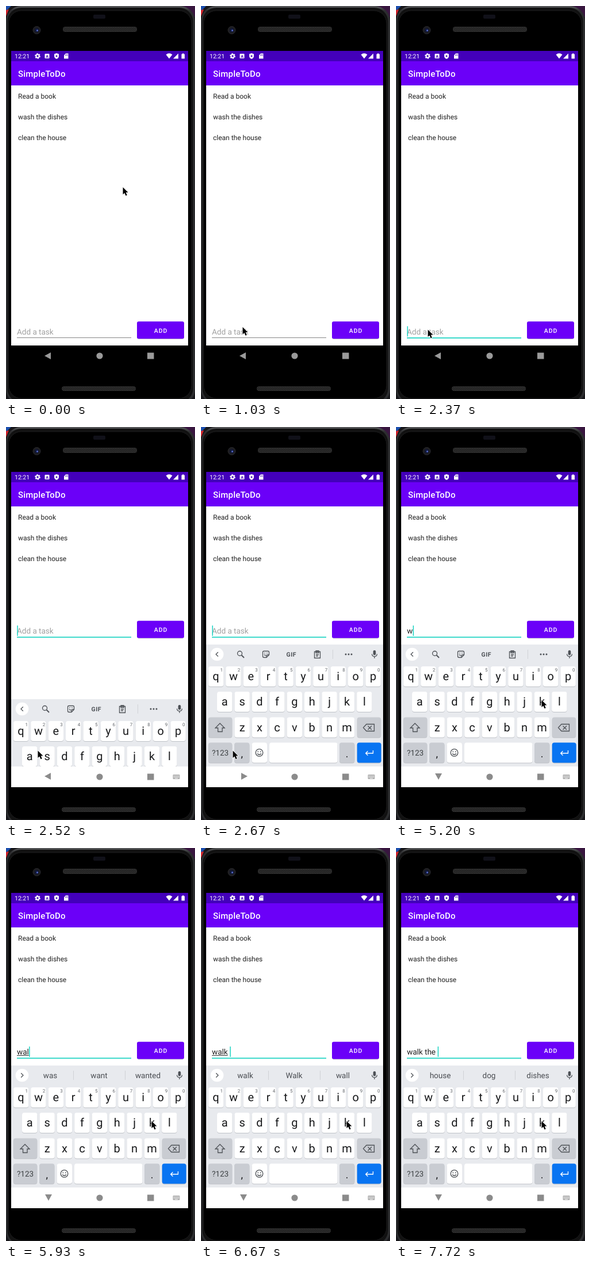
Write an HTML page that moves like this. It is 329 by 683 pixels and loops after 8000 ms.

```html
<!DOCTYPE html>
<html lang="en">
<head>
<meta charset="utf-8">
<title>To-do app</title>
<style>
  html, body { margin: 0; width: 100%; height: 100%; overflow: hidden; background: #000; }
  svg { display: block; width: 329px; height: 683px; }
  text { font-family: Roboto, sans-serif; white-space: pre; text-rendering: geometricPrecision; }
  .mid { text-anchor: middle; }
  .medium { font-weight: 500; }
  .item { font-size: 12px; fill: #212121; }
  .field { font-size: 13.5px; }
  .line { fill: none; stroke: #4d5156; stroke-width: 1.3; }
  .letter { font-size: 20px; fill: #17181a; }
</style>
</head>
<body>
<svg viewBox="0 0 329 683">
  <defs>
    <pattern id="mesh" width="3" height="3" patternUnits="userSpaceOnUse">
      <rect width="3" height="3" fill="#1d1d1d"/>
      <path d="M0 3L3 0" stroke="#3b3b3b"/>
    </pattern>
    <linearGradient id="rim" x2="0" y2="1">
      <stop offset="0" stop-color="#5a5b5d"/>
      <stop offset=".012" stop-color="#2c2d2f"/>
      <stop offset="1" stop-color="#2c2d2f"/>
    </linearGradient>
    <clipPath id="keyboardArea"><rect x="9" y="378" width="308" height="212"/></clipPath>
  </defs>

  <!-- phone -->
  <rect width="329" height="683" fill="#17171a"/>
  <path d="M0 0H9L0 9Z" fill="#1c4fae"/>
  <path d="M0 7L5 6L0 18Z" fill="#d0242c"/>
  <path d="M308 0H329V20Z" fill="#38163f"/>
  <rect x="0" y="0" width="329" height="692" rx="26" fill="url(#rim)"/>
  <rect x="2.5" y="3" width="323" height="686" rx="24" fill="#111"/>
  <rect x="4.500" y="8" width="318.500" height="674" rx="22" fill="#000" stroke="#1d1d1e"/>
  <rect x="152" y="15" width="21" height="7" rx="2" fill="#111119"/>
  <circle cx="53.500" cy="42" r="6.500" fill="#1c1c20" stroke="#2b2b2e"/>
  <circle cx="53.500" cy="42" r="3.500" fill="#10183a"/>
  <circle cx="54.500" cy="42.500" r="1.500" fill="#5a6cc8"/>
  <rect x="99.500" y="36.500" width="128" height="8" rx="3" fill="url(#mesh)" stroke="#303030"/>
  <rect x="97.500" y="661.500" width="128" height="7" rx="3" fill="url(#mesh)" stroke="#303030"/>

  <!-- app -->
  <rect x="9" y="78" width="308" height="512" fill="#fff"/>
  <rect x="9" y="78" width="308" height="18" fill="#4300ba"/>
  <rect x="9" y="96" width="308" height="42" fill="#6b00f8"/>
  <g fill="#fff">
    <text x="15" y="91" font-size="10.500">12:21</text>
    <circle cx="55" cy="87" r="2.700" fill="none" stroke="#fff" stroke-width="2"/>
    <circle cx="55" cy="87" r="4.100" fill="none" stroke="#fff" stroke-width="1.600" stroke-dasharray="2.1 2.193"/>
    <rect x="67.500" y="83" width="8" height="8" rx="1"/>
    <text class="mid" x="71.500" y="89.600" font-size="7" font-weight="700" fill="#4300ba">A</text>
    <path d="M88 82L92 83.500V87Q92 90.500 88 92Q84 90.500 84 87V83.500Z"/>
    <circle cx="88" cy="87" r="1.500" fill="#4300ba"/>
    <path d="M104 82.500H108.500V91.500H101V85.500Z"/>
    <path d="M103.500 84.500V86.500M105.200 84V86.500M107 84V86.500" stroke="#4300ba" stroke-width=".8"/>
    <path d="M278.500 84.500Q284 80 289.500 84.500L284 91.500Z"/>
    <path d="M291 91.500H300V82.500Z"/>
    <path d="M305.500 83.500H307V82.500H309.500V83.500H311V91.500H305.500Z"/>
    <text class="medium" x="21" y="123" font-size="15" letter-spacing=".19">SimpleToDo</text>
  </g>
  <text class="item" x="21" y="160.500">Read a book</text>
  <text class="item" x="21" y="196.500">wash the dishes</text>
  <text class="item" x="21" y="232.500">clean the house</text>

  <g id="entry">
    <text id="hint" class="field" x="19" y="570.500" fill="#a0a0a0">Add a task</text>
    <text id="typed" class="field" x="19" y="570.500" fill="#212121"></text>
    <rect id="composing" y="571.500" height="1" fill="#333"/>
    <rect id="baseline" x="19" y="576" width="199"/>
    <rect id="caret" y="556.500" width="1.500" height="18" fill="#1ad3c2"/>
    <rect x="228" y="549" width="82" height="30" rx="3.500" fill="#bdbdc4"/>
    <rect x="228" y="548.300" width="82" height="30" rx="3" fill="#6b00f8"/>
    <text class="mid medium" x="269.500" y="567.500" font-size="10.500" letter-spacing=".94" fill="#fff">ADD</text>
  </g>

  <!-- keyboard -->
  <g clip-path="url(#keyboardArea)">
    <g id="keyboard">
      <rect x="9" y="378" width="308" height="212" fill="#e8eaee"/>
      <circle cx="28" cy="395" r="11.300" fill="#fff"/>
      <path id="chevron" class="line" d="M29.800 391.200L26 395L29.800 398.800"/>
      <g id="tools" class="line">
        <circle cx="67.500" cy="393.500" r="4"/>
        <path d="M70.500 396.500L75 401" stroke-width="1.800"/>
        <path d="M109.500 389.500H116.500Q118.500 389.500 118.500 391.500V396L114 400.500H109.500Q107.500 400.500 107.500 398.500V391.500Q107.500 389.500 109.500 389.500ZM118.500 396H116Q114 396 114 398V400.500"/>
        <path d="M110.200 392.800H111.700M114.300 392.800H115.800M110.200 395.300Q111.500 397.500 113.500 396.500"/>
        <path d="M197.500 390.500H207.500V401.500H197.500ZM200 392.500H205V389H200ZM200 395.500H205M200 398H204"/>
        <path d="M229.500 387V403" stroke="#d0d2d6" stroke-width="1"/>
        <g fill="#4d5156" stroke="none">
          <text class="mid" x="157.300" y="398.600" font-size="10.500" font-weight="700" letter-spacing=".5">GIF</text>
          <circle cx="252" cy="395" r="1.500"/><circle cx="257" cy="395" r="1.500"/><circle cx="262" cy="395" r="1.500"/>
        </g>
      </g>
      <g id="suggestions" class="field mid" fill="#4a4d52">
        <path d="M117.500 387V403M207.500 387V403" stroke="#d0d2d6"/>
        <text x="77" y="400"></text><text x="162" y="400"></text><text x="247" y="400"></text>
      </g>
      <rect x="299.700" y="388" width="4.600" height="8.500" rx="2.300" fill="#4d5156"/>
      <path class="line" d="M297.500 394.500Q298 398.800 302 398.800T306.500 394.500M302 399V402"/>
      <g id="keys"></g>
      <g class="line">
        <path d="M33 515L41 523H37V529.500H29.500V523H25Z"/>
        <path d="M288 516.500H301.500V528.500H288L282.500 522.500ZM290.500 519.500L297 526M297 519.500L290.500 526"/>
        <circle cx="101.500" cy="566" r="6.300"/>
        <path d="M98.200 567.500Q101.500 571.500 104.800 567.500"/>
        <path d="M98.500 564.300H100M103 564.300H104.500" stroke-width="1.800"/>
        <path d="M299.500 562V567H287M290.500 563.200L286.700 567L290.500 570.800" style="stroke:#fff"/>
      </g>
    </g>
  </g>

  <!-- navigation bar -->
  <rect id="navBar" x="9" y="590" width="308" height="36"/>
  <g id="navIcons">
    <path id="back" d="M-6 0L5 -6V6Z"/>
    <circle cx="163" cy="608" r="5.600"/>
    <rect x="246" y="602.500" width="11.500" height="11"/>
    <g id="switcher" fill="#b4b4b4">
      <rect x="290.500" y="604" width="12" height="8" rx="1"/>
      <path d="M292 606.500H301M292 608.500H301" stroke="#fff" stroke-dasharray="1 1"/>
      <path d="M294 610.500H299" stroke="#fff" stroke-width=".8"/>
    </g>
  </g>
  <path id="pointer" d="M0 0V12.500L2.900 9.900L5 14.800L7.200 13.800L5.200 9.100H9Z" fill="#000" stroke="#fff" stroke-width="1.400" paint-order="stroke"/>
</svg>
<script>
const LOOP = 8000;
const $ = id => document.getElementById(id);
const show = (id, on) => $(id).setAttribute('visibility', on ? 'inherit' : 'hidden');
const set = (id, attrs) => Object.entries(attrs).forEach(([k, v]) => $(id).setAttribute(k, v));

// Last row whose start time has passed.
const at = (rows, t) => rows.reduce((found, row) => row[0] <= t ? row : found);

function key(x, y, w, fill = '#fff', label = '', size = 20, dy = 24) {
  return `<rect x="${x}" y="${y + 1}" width="${w}" height="35" rx="4" fill="#bfc2c7"/>
    <rect x="${x}" y="${y}" width="${w}" height="35" rx="4" fill="${fill}"/>
    <text class="letter mid" x="${x + w / 2}" y="${y + dy}" style="font-size:${size}px">${label}</text>`;
}

function buildKeys() {
  const pitch = 30.4, gray = '#c9ccd2';
  let out = '';
  [['qwertyuiop', 26, 416], ['asdfghjkl', 41.2, 460], ['zxcvbnm', 71.6, 504.5]].forEach(([letters, start, y], row) => {
    [...letters].forEach((c, i) => {
      const x = start + i * pitch;
      out += key(x - 13.2, y, 26.4, '#fff', c);
      if (!row) out += `<text class="mid" x="${x + 9.7}" y="425" font-size="8" fill="#5f6368">${(i + 1) % 10}</text>`;
    });
  });
  out += key(12.8, 504.5, 41.5, gray) + key(271.7, 504.5, 41.5, gray);
  out += key(12.8, 548.5, 41.5, gray, '<tspan fill="#3c4043">?123</tspan>', 13.5, 22.5);
  out += key(58, 548.5, 26.4, gray, ',', 18, 25) + key(88.6, 548.5, 26.4) + key(119, 548.5, 118.5);
  out += key(241, 548.5, 26.4, gray, '.', 18, 25) + key(271.7, 548.5, 42, '#0874f2');
  $('keys').innerHTML = out;
}

// time, x, y
const pointerSteps = [
  [0, 203.5, 315], [450, 196, 335], [600, 160, 408], [740, 112, 494], [880, 82, 545], [1030, 72.5, 558],
  [1630, 69, 559], [1780, 63, 561], [1930, 57, 562], [2080, 55.5, 562.5],
  [2820, 150, 516], [2970, 253.5, 474.5]
];

// time, text, caret, suggestions, start of composing word
const typing = [
  [0, '', 0], [2370, '', 1], [2970, '', 0], [3420, '', 1], [3870, '', 0],
  [4010, 'c', 1], [4310, 'c', 1, 'c can call', 0], [4460, '', 1, 'c can call'], [4610, '', 1], [5050, '', 0],
  [5200, 'w', 1], [5490, 'w', 1, 'w with was', 0],
  [5640, 'wa', 1, 'w with was', 0], [5790, 'wa', 1, 'was want wanted', 0],
  [5930, 'wal', 1, 'was want wanted', 0], [6080, 'wal', 1, 'wal walk wall', 0],
  [6220, 'walk', 1, 'wal walk wall', 0], [6370, 'walk', 1, 'walk Walk wall', 0],
  [6670, 'walk ', 1, 'walk Walk wall', 0], [6820, 'walk ', 1, 'the to through'],
  [6970, 'walk t', 1, 'the to through', 5], [7120, 'walk th', 1, 'the this that', 5],
  [7270, 'walk the', 1, 'the The they', 5], [7420, 'walk the ', 1, 'the The they', 5],
  [7720, 'walk the ', 1, 'house dog dishes']
];

// time, keyboard offset, back icon angle, back icon x
const keyboardSteps = [[0, 212, 0, 73], [2520, 95, 0, 73], [2670, 0, 180, 75], [2820, 0, 270, 74]];

const ruler = document.createElement('canvas').getContext('2d');
function width(text) {
  ruler.font = '13.5px Roboto, sans-serif';
  return ruler.measureText(text).width;
}

function drawEntry(t) {
  const [, text, caret, words, start] = at(typing, t);
  const focused = t >= 2370;
  $('typed').textContent = text;
  show('hint', !text);
  show('caret', caret);
  set('caret', { x: 19.3 + width(text) });
  set('baseline', focused ? { height: 1.7, fill: '#1ad3c2' } : { height: 1, fill: '#858585' });

  show('composing', start !== undefined);
  if (start !== undefined) {
    set('composing', { x: 19 + width(text.slice(0, start)), width: width(text.slice(start).trim()) });
  }
  show('tools', !words);
  show('suggestions', words);
  set('chevron', { transform: words ? 'rotate(180 28 395)' : '' });
  const list = (words || '  ').split(' ');
  $('suggestions').querySelectorAll('text').forEach((el, i) => el.textContent = list[i]);
}

function draw(t) {
  const [, x, y] = at(pointerSteps, t);
  const [, offset, angle, backX] = at(keyboardSteps, t);
  const open = t >= 2520;
  set('pointer', { transform: `translate(${x} ${y})` });
  set('entry', { transform: `translate(0 ${open ? -211.5 : 0})` });
  set('keyboard', { transform: `translate(0 ${offset})` });
  set('navBar', { fill: open ? '#fff' : '#000' });
  set('navIcons', { fill: open ? '#8b8b8b' : '#9a9a9a' });
  set('back', { transform: `translate(${backX} ${open ? 607 : 608}) rotate(${angle})` });
  show('keyboard', open);
  show('switcher', open);
  drawEntry(t);
}

buildKeys();
const begin = performance.now();
function tick() {
  draw((performance.now() - begin) % LOOP);
  requestAnimationFrame(tick);
}
tick();
</script>
</body>
</html>
```
